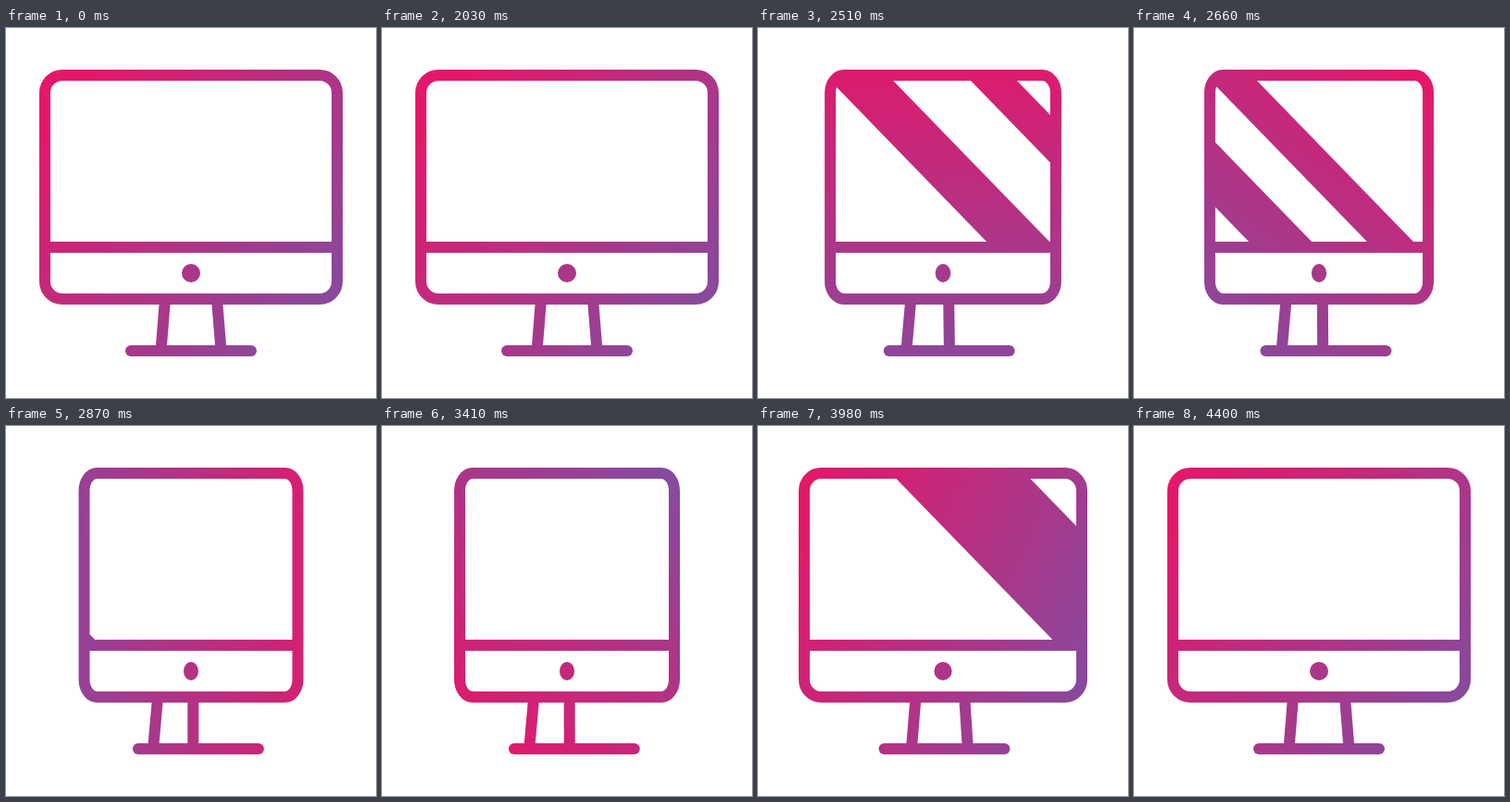
These frames come from a looping animation (400 px wide and 400 px high, 4.43 s). An HTML page with a canvas:

```html
<!DOCTYPE html>
<html>
<head>
<meta charset="utf-8">
<style>
html, body { margin: 0; width: 100%; height: 100%; overflow: hidden; background: #fff; }
canvas { display: block; width: 400px; height: 400px; }
</style>
</head>
<body>
<canvas id="stage" width="400" height="400"></canvas>
<script>
const ctx = document.getElementById('stage').getContext('2d');
const LOOP = 4430;
const START = 2030;
const PINK = '#e3186a', PURPLE = '#874a9d';

// Cubic easing with flat ends; x1 and x2 are the horizontal handles.
function ease(x, x1, x2) {
  if (x <= 0) return 0;
  if (x >= 1) return 1;
  let low = 0, high = 1;
  for (let i = 0; i < 24; i++) {
    const s = (low + high) / 2, r = 1 - s;
    if (3 * r * r * s * x1 + 3 * r * s * s * x2 + s * s * s < x) low = s;
    else high = s;
  }
  return low * low * (3 - 2 * low);
}

function turnAt(t) {
  return ease((t - START) / 1000, 0.167, 0.1) - ease((t - 3243) / 1170, 0.6, 0.347);
}

function makeGradient(t) {
  const angle = (40 + 360 * ease((t - START) / 2370, 0.322, 0.466)) * Math.PI / 180;
  const dx = 180 * Math.cos(angle), dy = 180 * Math.sin(angle);
  const gradient = ctx.createLinearGradient(200 - dx, 200 - dy, 200 + dx, 200 + dy);
  gradient.addColorStop(0, PINK);
  gradient.addColorStop(1, PURPLE);
  return gradient;
}

function line(x1, y1, x2, y2, cap = 'butt') {
  ctx.lineCap = cap;
  ctx.beginPath();
  ctx.moveTo(x1, y1);
  ctx.lineTo(x2, y2);
  ctx.stroke();
}

// Rounded body outline whose corners narrow along with its width.
function bodyPath(half) {
  const left = 200 - half, right = 200 + half, top = 51, bottom = 293;
  const ry = 19, rx = ry * half / 158, q = Math.PI / 2;
  ctx.beginPath();
  ctx.ellipse(left + rx, top + ry, rx, ry, 0, 2 * q, 3 * q);
  ctx.ellipse(right - rx, top + ry, rx, ry, 0, 3 * q, 4 * q);
  ctx.ellipse(right - rx, bottom - ry, rx, ry, 0, 0, q);
  ctx.ellipse(left + rx, bottom - ry, rx, ry, 0, q, 2 * q);
  ctx.closePath();
}

// Diagonal glare; center is measured along the inner top edge of the screen.
function glare(center, width) {
  const slope = 1.03, top = 45, bottom = 237;
  const a = center + (top - 57) / slope, b = center + (bottom - 57) / slope;
  const h = width / 2;
  ctx.beginPath();
  ctx.moveTo(a - h, top);
  ctx.lineTo(a + h, top);
  ctx.lineTo(b + h, bottom);
  ctx.lineTo(b - h, bottom);
  ctx.fill();
}

function drawGlares(t, half) {
  ctx.save();
  bodyPath(half);
  ctx.clip();
  if (t > START && t < 3100) {
    glare(113 - 0.82 * (t - 2510), 68);
    glare(256 - 0.98 * (t - 2510), 50);
  } else if (t > 3420) {
    glare(21.5 + 0.95 * (t - 3770), 145);
  }
  ctx.restore();
}

function draw(t) {
  const turn = turnAt(t);
  const half = 158 - 43 * turn;
  ctx.fillStyle = '#fff';
  ctx.fillRect(0, 0, 400, 400);
  ctx.fillStyle = ctx.strokeStyle = makeGradient(t);

  drawGlares(t, half);

  ctx.lineWidth = 12;
  line(172 - 8 * turn, 293, 167.5 - 8.5 * turn, 349);
  line(228 - 26 * turn, 293, 232.5 - 30.5 * turn, 349);
  line(135 + 8 * turn, 349, 265 + 8 * turn, 349, 'round');
  line(200 - half, 237, 200 + half, 237);
  bodyPath(half);
  ctx.stroke();

  ctx.beginPath();
  ctx.ellipse(200, 265, 10 - 2 * turn, 10, 0, 0, 2 * Math.PI);
  ctx.fill();
}

const began = performance.now();
function tick() {
  draw((performance.now() - began) % LOOP);
  requestAnimationFrame(tick);
}
tick();
</script>
</body>
</html>
```
